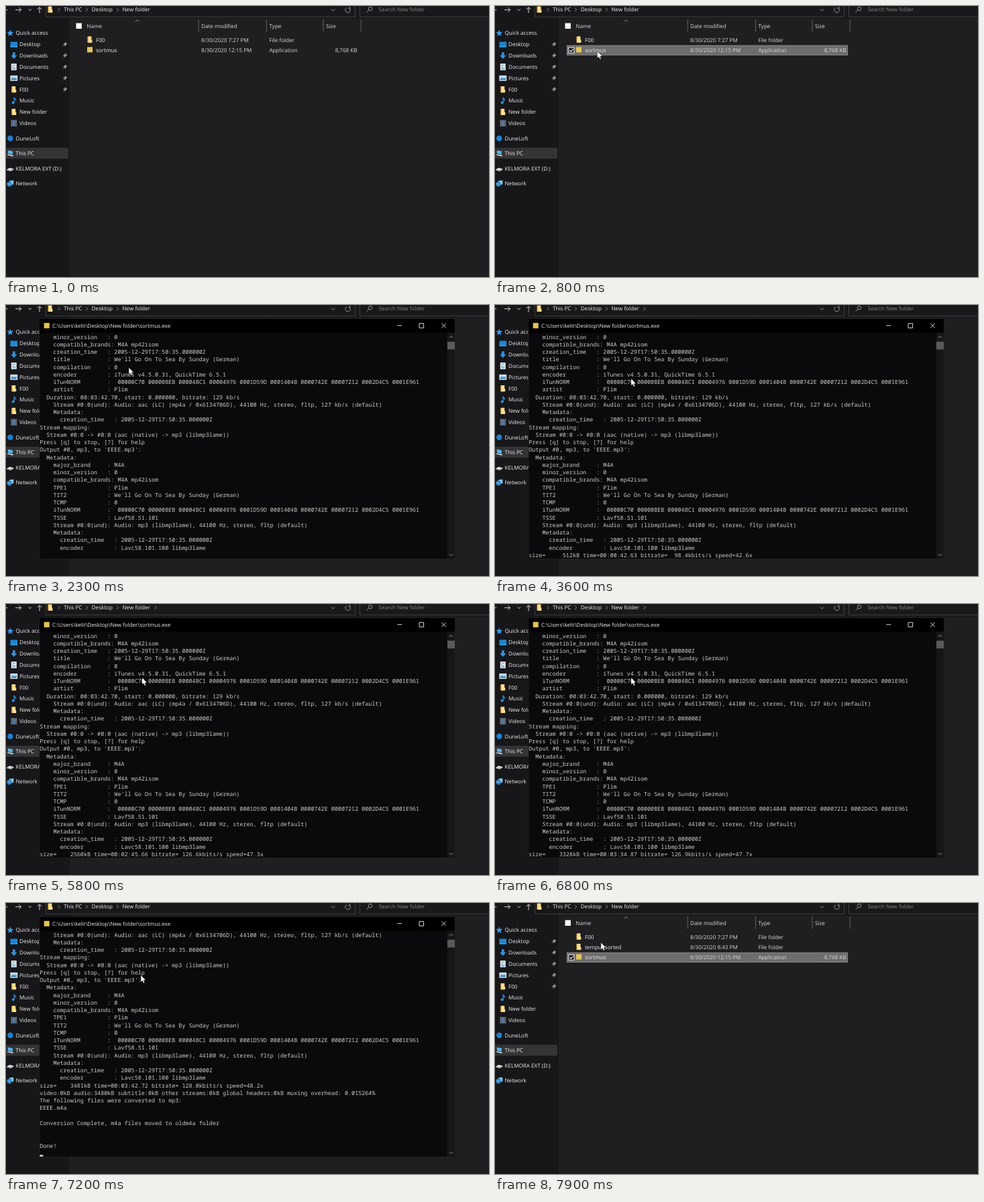
An HTML page that plays this animation: 720 px wide and 405 px high, repeating every 8 s.

```html
<!DOCTYPE html>
<html lang="en">
<head>
<meta charset="utf-8">
<title>Folder and console</title>
<style>
  html, body { margin: 0; width: 100%; height: 100%; overflow: hidden; background: #1f1e20; }
  svg { display: block; width: 720px; height: 405px; }
  text { font: 8.1px "Open Sans", "Noto Sans", sans-serif; fill: #efefef; white-space: pre; text-rendering: geometricPrecision; }
  .dim { fill: #dadada; }
  .hint { fill: #858585; }
  .end { text-anchor: end; }
  #log text { font: 8.4375px "Noto Sans Mono", "DejaVu Sans Mono", monospace; fill: #cccccc; }
  .line { fill: none; stroke: #d8d8d8; stroke-width: 1; }
  .thin { fill: none; stroke: #a0a0a0; stroke-width: .9; }
  .edge { fill: none; stroke: #4a4a4b; stroke-width: .8; }
  #console { transform-origin: 360px 200px; }
</style>
</head>
<body>
<svg viewBox="0 0 720 405">
  <defs>
    <g id="folder">
      <path d="M-3.6-4.6h5.4v9.2h-5.4z" fill="#e3b04a"/>
      <path d="M-2.2-4.6h4.6v4.8h1v4.4h-5.6z" fill="#ffdf8a"/>
    </g>
    <g id="star"><path d="M0-5l1.4 3.3 3.5.3-2.7 2.3.9 3.5L0 2.5l-3.1 1.9.9-3.5-2.7-2.3 3.5-.3z" fill="#2f9bf0"/></g>
    <g id="desk"><rect x="-5.3" y="-4" width="10.6" height="8" rx=".5" fill="#1687d9"/><path d="M-5.3 2.6h10.6v1.4h-10.6z" fill="#2fa9ec"/></g>
    <g id="down"><path d="M-1.8-5h3.6v4.4h3L0 4.8-4.8-.6h3z" fill="#2b95ea"/></g>
    <g id="doc"><rect x="-4" y="-5" width="8" height="10" fill="#e8eef2"/><path d="M-2.5-2.7h5M-2.5-.5h2M-2.5 1.5h5M-2.5 3.3h5" stroke="#4a8fb5" stroke-width=".9"/></g>
    <g id="pic"><rect x="-5.4" y="-4" width="10.8" height="8" fill="#e9eff3"/><path d="M-4.4 2.8v-2l3-1.6 2.6 1 3-.8v3.4z" fill="#3f8fc4"/><path d="M-4.4-3h8.8v2l-3 .8-2.8-1-3 1.4z" fill="#a9d5ee"/></g>
    <g id="note"><circle cx="-1.2" cy="3" r="2" fill="#2b95ea"/><path d="M.3 3v-8c.4 2.2 3 2.4 2.4 5" fill="none" stroke="#2b95ea" stroke-width="1.3"/></g>
    <g id="film"><rect x="-4.6" y="-5" width="9.2" height="10" fill="#3c434c"/><rect x="-2.4" y="-4.4" width="4.8" height="8.8" fill="#55789e"/><path d="M-3.5-4.5v9M3.5-4.5v9" stroke="#b9bec4" stroke-width="1" stroke-dasharray="1 1"/></g>
    <g id="disc"><circle r="4.2" fill="#1584dc"/></g>
    <g id="pc"><path d="M-3.4-4.4l7 1.2v5l-7-1.4z" fill="#4fb6f0"/><path d="M-5 2.4l2-1 8 1.7-1.4 1.5z" fill="#d6dde2"/></g>
    <g id="drive"><path d="M-5 1.4l4-2.4 6 1.4v1.6l-4.4 2.2-5.6-1.4z" fill="#dcdcdc"/><path d="M-5 1.8l5.4 1.3 4.6-2.3" fill="none" stroke="#8a8a8a" stroke-width=".7"/></g>
    <g id="net"><path d="M-1.5-4.2l6.5-.6v6l-4 1z" fill="#7cc9f4"/><circle cx="-1.2" cy=".8" r="3.7" fill="#2384cc"/><path d="M-4 0q2.6 1.8 5 .3" fill="none" stroke="#a8def8" stroke-width=".8"/></g>
    <g id="app"><rect x="-4" y="-4.2" width="8" height="8" fill="#e6c64a"/></g>
    <g id="pin"><path d="M.8-3.4l2.8 2.8-1 .2-1.3 1.4-.1 1.7-3.4-3.4 1.7-.1L.6-2.4zM-.6 1l-2.6 2.6" fill="#9a9a9a" stroke="#9a9a9a" stroke-width=".5"/></g>
    <path id="next" d="M-1.4-2.6L1.2 0-1.4 2.6" class="thin"/>
    <path id="drop" d="M-2.8-1.4L0 1.4 2.8-1.4" class="thin"/>
  </defs>

  <rect width="720" height="405" fill="#1f1e20"/>
  <rect width="720" height="19" fill="#19181a"/>
  <rect width="95" height="405" fill="#171618"/>

  <!-- address bar -->
  <path class="edge" d="M59.5 0v16.3h461V0M527.5 0v16.3H720"/>
  <path class="line" d="M0 5.7h2.2M14 5.7h8.6M19.4 2.5l3.2 3.2-3.2 3.2M50 10.5V2M46.8 5L50 1.8 53.2 5"/>
  <path class="line" d="M33.6 4.6l2.2 2.2L38 4.6"/>
  <use href="#folder" x="66" y="5.3"/>
  <use href="#next" x="79" y="5.5"/>
  <use href="#next" x="120.5" y="5.5"/>
  <use href="#next" x="166.5" y="5.5"/>
  <use href="#next" x="223" y="5.5" id="lastNext"/>
  <use href="#drop" x="487.5" y="6"/>
  <path class="thin" d="M512.3 3.2a3.8 3.8 0 1 1-4.6-.7M512.6 1v2.6h-2.6"/>
  <path class="thin" d="M537.6 9.6l3.2-3.4"/><circle class="thin" cx="543" cy="4.2" r="2.7"/>
  <g id="crumbs"></g>

  <rect y="211.8" width="93" height="16.4" fill="#343335"/>
  <g id="side"></g>

  <!-- file list -->
  <path d="M287.2 20v18.5M388.4 20v18.5M473 20v18.5M529.2 20v18.5" stroke="#6a696b" stroke-width=".9"/>
  <path class="thin" d="M193 23.2l2.6-2.4 2.6 2.4"/>
  <rect x="104.5" y="25.6" width="8.4" height="8.4" fill="#fff"/>
  <g id="heads"></g>
  <g id="files"></g>

  <g id="console">
    <rect x="50" y="20.5" width="619.4" height="358.8" fill="#0a090b" stroke="#232224" stroke-width=".7"/>
    <rect x="50.4" y="20.9" width="618.6" height="20.6" fill="#000"/>
    <rect x="657.6" y="41.5" width="11.4" height="337.4" fill="#161517"/>
    <rect id="thumb" x="658" y="53.6" width="11" height="11.6" fill="#5a595b"/>
    <path class="thin" d="M660.8 49l2.7-2.8 2.7 2.8M660.8 372l2.7 2.8 2.7-2.8"/>
    <path class="line" d="M583.3 30.7h7M616 27.6h6.6v6.6H616zM649.2 27.6l6.6 6.6M655.8 27.6l-6.6 6.6"/>
    <use href="#app" x="60.7" y="31"/>
    <text x="69" y="33.9" style="font-size:8px">C:\Users\kelit\Desktop\New folder\sortmus.exe</text>
    <g id="log"></g>
    <rect id="caret" x="50.4" y="376.4" width="5" height="2.4" fill="#e0e0e0"/>
  </g>

  <path id="mouse" d="M0 0v10l2.3-2 1.6 3.6 1.6-.7L4 7.4l3-.2z" fill="#fff" stroke="#111" stroke-width=".3"/>
</svg>

<script>
const LOOP = 8000, TICK = 100, ROWS = 30;
const $ = id => document.getElementById(id);
const label = (x, y, s, cls = '') => `<text x="${x}" y="${y + 2.9}" class="${cls}">${s}</text>`;
const icon = (id, x, y) => `<use href="#${id}" x="${x}" y="${y}"/>`;
const show = (id, on) => $(id).setAttribute('visibility', on ? 'visible' : 'hidden');

$('crumbs').innerHTML = label(86, 5.5, 'This PC') + label(127.7, 5.5, 'Desktop') +
  label(173.5, 5.5, 'New folder') + label(555.5, 5.5, 'Search New folder', 'hint');

$('heads').innerHTML = [[120.3, 'Name'], [291, 'Date modified'], [392.5, 'Type'], [477, 'Size']]
  .map(([x, s]) => label(x, 29.8, s, 'dim')).join('');

const pinned = ['Desktop', 'Downloads', 'Documents', 'Pictures', 'F00'];
const quick = [['desk', 'Desktop'], ['down', 'Downloads'], ['doc', 'Documents'], ['pic', 'Pictures'],
  ['folder', 'F00'], ['note', 'Music'], ['folder', 'New folder'], ['film', 'Videos']];
const roots = [['star', 'Quick access', 40.5], ['disc', 'DuneLoft', 197.8], ['pc', 'This PC', 220.2],
  ['drive', 'KELMORA EXT (D:)', 242.8], ['net', 'Network', 265.4]];
$('side').innerHTML =
  roots.map(([id, s, y]) => icon(id, 6.3, y) + label(14.5, y, s)).join('') +
  quick.map(([id, s], i) => {
    const y = 57.4 + i * 16.83;
    return icon(id, 11.8, y) + label(20, y, s) + (pinned.includes(s) ? icon('pin', 87.5, y) : '');
  }).join('');

// file rows are drawn around y = 0 and moved into place
const fileRow = (id, y, pic, name, date, type, size = '', back = '') =>
  `<g id="${id}" transform="translate(0 ${y})">${back}${icon(pic, 125, -.6)}${label(134, 0, name)}` +
  label(291, 0, date, 'dim') + label(392.5, 0, type, 'dim') + label(523.5, 0, size, 'dim end') + '</g>';
const highlight = `<rect id="hover" x="107" y="-7.4" width="419" height="14.8" fill="#4b4a4c"/>
  <rect id="picked" x="107.3" y="-7.1" width="418.4" height="14.2" fill="#6d6c6e" stroke="#a3a2a4" stroke-width=".7"/>
  <rect id="box" x="109.8" y="-4" width="8" height="8" fill="#161517" stroke="#fff" stroke-width=".9"/>
  <path id="tick" d="M111.4 0l1.8 2 3-3.8" fill="none" stroke="#fff" stroke-width="1.1"/>`;
$('files').innerHTML =
  fileRow('first', 50.8, 'folder', 'F00', '8/30/2020 7:27 PM', 'File folder') +
  fileRow('made', 66.1, 'folder', 'tempunsorted', '8/30/2020 8:43 PM', 'File folder') +
  fileRow('exe', 66.1, 'app', 'sortmus', '8/30/2020 12:15 PM', 'Application', '8,768 KB', highlight);

// console text
const pair = (indent, key, value) => ' '.repeat(indent) + key.padEnd(16) + ': ' + value;
const norm = pair(4, 'iTunNORM', ' 00000C70 00000BEB 00004BC1 00004976 0001D59D 0001404B 0000742E 00007212 0002D4C5 0001E961');
const created = '2005-12-29T17:50:35.000000Z';
const song = "We'll Go On To Sea By Sunday (German)";
const brands = [pair(4, 'minor_version', '0'), pair(4, 'compatible_brands', 'M4A mp42isom')];
const body = [
  ...brands,
  pair(4, 'creation_time', created),
  pair(4, 'title', song),
  pair(4, 'compilation', '0'),
  pair(4, 'encoder', 'iTunes v4.5.0.31, QuickTime 6.5.1'),
  norm,
  pair(4, 'artist', 'Plim'),
  '  Duration: 00:03:42.70, start: 0.000000, bitrate: 129 kb/s',
  '    Stream #0:0(und): Audio: aac (LC) (mp4a / 0x6134706D), 44100 Hz, stereo, fltp, 127 kb/s (default)',
  '    Metadata:',
  pair(6, 'creation_time', created),
  'Stream mapping:',
  '  Stream #0:0 -> #0:0 (aac (native) -> mp3 (libmp3lame))',
  'Press [q] to stop, [?] for help',
  "Output #0, mp3, to 'EEEE.mp3':",
  '  Metadata:',
  pair(4, 'major_brand', 'M4A'),
  ...brands,
  pair(4, 'TPE1', 'Plim'),
  pair(4, 'TIT2', song),
  pair(4, 'TCMP', '0'),
  norm,
  pair(4, 'TSSE', 'Lavf58.51.101'),
  '    Stream #0:0(und): Audio: mp3 (libmp3lame), 44100 Hz, stereo, fltp (default)',
  '    Metadata:',
  pair(6, 'creation_time', created),
  pair(6, 'encoder', 'Lavc58.101.100 libmp3lame')
];
const closing = [
  'video:0kB audio:3480kB subtitle:0kB other streams:0kB global headers:0kB muxing overhead: 0.015264%',
  'The following files were converted to mp3:',
  'EEEE.m4a', '',
  'Conversion Complete, m4a files moved to oldm4a folder', '', '',
  'Done!'
];

function status(kB, sec, rate, speed) {
  const clock = '00:' + String(Math.floor(sec / 60)).padStart(2, '0') + ':' + (sec % 60).toFixed(2).padStart(5, '0');
  return `size=${String(kB).padStart(8)}kB time=${clock} bitrate=${rate.toFixed(1).padStart(6)}kbits/s speed=` +
    `${String(+speed.toPrecision(3)).padStart(4)}x`;
}

// encoder reports twice a second; output is flushed in 256 kB blocks
function progress(t) {
  const spent = .5 + .5 * Math.floor((t - 2800) / 500);
  const sec = 42.63 + 49.212 * (spent - 1);
  const kB = Math.floor(sec * 128 / 8.192 / 256) * 256;
  return status(kB, sec, kB * 8.192 / sec, sec / spent);
}

function screen(t) {
  if (t < 2000) return [];
  if (t < 2800) return body;
  if (t < 6900) return [...body, progress(t)];
  return [...body.slice(9), status(3481, 222.72, 128, 48.2), ...closing];
}

$('log').innerHTML = Array.from({ length: ROWS }, (_, i) => `<text x="50.2" y="${50.5 + i * 11.25}"></text>`).join('');
const rows = [...$('log').children];

const ramp = (t, a, b) => Math.min(1, Math.max(0, (t - a) / (b - a)));
const smooth = k => k * k * (3 - 2 * k);

// pointer stops: time, x, y
const path = [[300, 150, 61.5], [500, 152.5, 67.8], [1900, 152.5, 67.8], [2600, 203, 110.3], [7100, 203, 110.3], [7900, 158, 59.3]];
function pointer(t) {
  let i = 0;
  while (i < path.length - 2 && t >= path[i + 1][0]) i++;
  const [a, b] = [path[i], path[i + 1]], k = smooth(ramp(t, a[0], b[0]));
  return [a[1] + (b[1] - a[1]) * k, a[2] + (b[2] - a[2]) * k];
}

function draw(t) {
  const open = ramp(t, 1100, 1400) * (1 - ramp(t, 7200, 7500));
  $('console').style.opacity = open;
  $('console').style.transform = `scale(${.92 + .08 * open})`;
  show('lastNext', t >= 3500 && t < 7200);
  $('thumb').setAttribute('y', t < 2000 ? 53.6 : 54.8);

  const lines = screen(t);
  rows.forEach((row, i) => row.textContent = lines[i] || '');
  show('caret', t >= 6900);

  const done = t >= 6900;
  show('made', done);
  $('exe').setAttribute('transform', `translate(0 ${done ? 81.3 : 66.1})`);
  show('hover', t >= 300 && t < 800);
  show('box', t >= 300);
  show('picked', t >= 800);
  show('tick', t >= 800);

  show('mouse', t >= 300);
  $('mouse').setAttribute('transform', `translate(${pointer(t)})`);
}

let last = -1;
const start = performance.now();
function frame() {
  const t = Math.floor(((performance.now() - start) % LOOP) / TICK) * TICK;
  if (t !== last) draw(last = t);
  requestAnimationFrame(frame);
}
frame();
</script>
</body>
</html>
```
